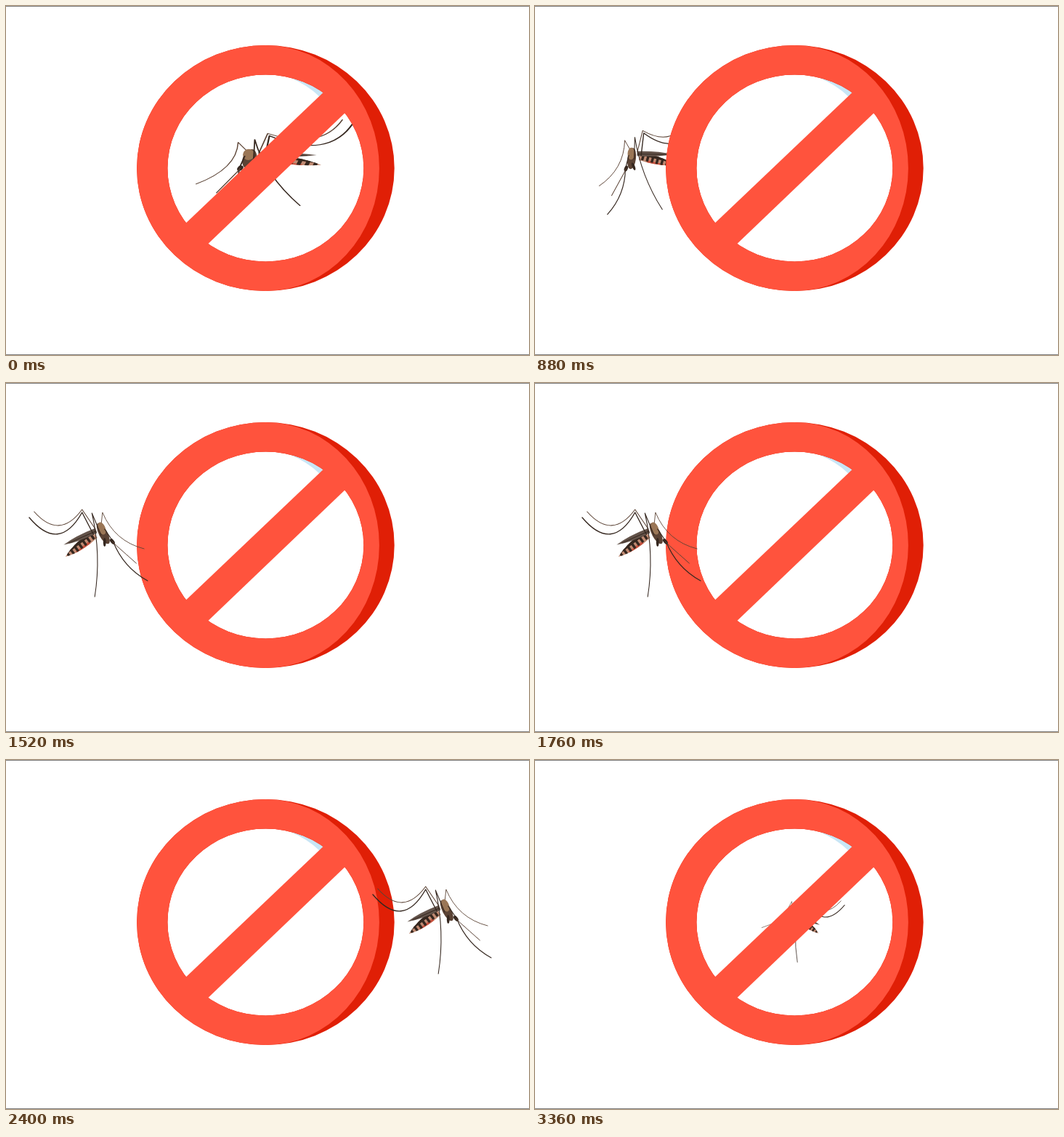
Write an HTML page with a canvas that moves like this. It is 720 px wide and 480 px high and loops after 3.44 s.

```html
<!DOCTYPE html>
<html lang="en">
<head>
<meta charset="utf-8">
<title>No mosquitoes</title>
<style>
html, body { margin: 0; width: 100%; height: 100%; overflow: hidden; background: #fff; }
canvas { display: block; }
</style>
</head>
<body>
<canvas id="stage" width="720" height="480"></canvas>
<script>
const ctx = document.getElementById('stage').getContext('2d');
const LOOP = 3440, STEP = 80, TAU = Math.PI * 2;
const DARK = '#35271f', BROWN = '#5b4335', TAN = '#9a7656';

const ramp = (t, from, to) => Math.min(1, Math.max(0, (t - from) / (to - from)));
const easeOut = u => 1 - (1 - u) ** 2;

// Out to the left behind the sign, across its front, back behind it
function poseAt(t) {
  const leave = easeOut(ramp(t, 0, 1263));
  const gather = ramp(t, 1280, 1760) ** 2;
  const cross = ramp(t, 1760, 2400);
  const back = ramp(t, 2400, 3360) ** 1.5;
  const turn = ramp(t, 1280, 1520);
  const turnBack = easeOut(ramp(t, 2400, 3040));
  const stretch = 1 - ramp(t, 0, 500);
  const grow = ramp(t, 500, 1280);
  const shrink = ramp(t, 2800, 3360);
  const size = 1 - .28 * shrink;
  return {
    x: 343 - 226 * leave + 44 * gather + 440 * cross - 244 * back,
    y: 207 - 2 * grow + 9 * shrink,
    sx: (2 * turn - 1 - 2 * turnBack) * (.97 + .63 * stretch) * size,
    sy: (.84 + .16 * grow) * size,
    tilt: .38 * (1 - turn),
    inFront: t > 1320 && t < 2760
  };
}

// Straight from hip to knee, then bowed down to the foot
function leg(color, width, hip, knee, foot, bow) {
  const [kx, ky] = knee, [fx, fy] = foot;
  ctx.strokeStyle = color;
  ctx.lineWidth = width;
  ctx.beginPath();
  ctx.moveTo(...hip);
  ctx.lineTo(kx, ky);
  ctx.quadraticCurveTo(
    (kx + fx) / 2 - bow * (fy - ky),
    (ky + fy) / 2 + bow * (fx - kx), fx, fy);
  ctx.stroke();
}

function blob(color, x, y, rx, ry, turn) {
  ctx.beginPath();
  ctx.ellipse(x, y, rx, ry, turn, 0, TAU);
  ctx.fillStyle = color;
  ctx.fill();
}

// Pointed shape along the x axis
function leaf(color, length, width) {
  ctx.beginPath();
  ctx.moveTo(0, -width);
  ctx.quadraticCurveTo(length * .6, -width * 1.4, length, 0);
  ctx.quadraticCurveTo(length * .6, width * 1.4, 0, width);
  ctx.fillStyle = color;
  ctx.fill();
}

function abdomen() {
  ctx.save();
  ctx.translate(-6, 3);
  ctx.rotate(2.5);
  leaf('#c08a72', 52, 6);
  ctx.clip();
  ctx.fillStyle = '#c8523f';
  ctx.fillRect(12, -8, 24, 5);
  ctx.fillStyle = DARK;
  ctx.fillRect(0, 2, 52, 6);
  for (let x = 3; x < 50; x += 7) ctx.fillRect(x, -5, 3.5, 12);
  ctx.restore();
}

function wing() {
  ctx.save();
  ctx.translate(-4, -2);
  ctx.rotate(2.74);
  leaf('#63534a', 50, 3.5);
  ctx.fillStyle = DARK;
  ctx.fillRect(0, -1, 42, 1);
  ctx.restore();
}

// Faces right, with the thorax at the zero point
function mosquito({ x, y, sx, sy, tilt }) {
  ctx.save();
  ctx.translate(x, y);
  ctx.scale(sx, sy);
  ctx.rotate(tilt);
  ctx.lineCap = ctx.lineJoin = 'round';

  leg(BROWN, .9, [2, 0], [5, -27], [64, 23], .25);
  leg(BROWN, 1.1, [-5, -4], [-24, -31], [-92, -28], -.6);
  abdomen();
  wing();

  blob(BROWN, 6, 2, 6, 16, -.5);
  blob(TAN, 4, -5, 5, 9, -.4);
  blob(DARK, 8, 14, 2, 6, 0);
  blob(DARK, 19, 13, 2.5, 4.5, -.7);

  leg(DARK, 1.4, [-8, 3], [-24, -27], [-99, -20], -.7);
  leg(DARK, 1.1, [3, 4], [-10, -26], [-6, 89], -.1);
  leg(DARK, 1.2, [8, -4], [20, 13], [69, 67], .18);
  leg(BROWN, 1, [19, 13], [24, 18], [53, 43], 0);
  ctx.restore();
}

function glint() {
  ctx.beginPath();
  ctx.moveTo(388, 92);
  ctx.lineTo(440, 116);
  ctx.lineTo(432, 125);
  ctx.quadraticCurveTo(416, 109, 390, 98);
  ctx.fillStyle = '#c8e6f6';
  ctx.fill();
}

function sign() {
  const cx = 357.4, cy = 223, rx = 177.3, ry = 169, up = -Math.PI / 2;

  // A ring whose right half may be narrower than its left
  const ring = (color, right) => {
    ctx.beginPath();
    ctx.ellipse(cx, cy, rx, ry, 0, -up, -3 * up);
    ctx.ellipse(cx, cy, right, ry, 0, up, -up);
    ctx.moveTo(cx + 135, cy);
    ctx.ellipse(cx, cy, 135, 128.5, 0, 0, TAU);
    ctx.fillStyle = color;
    ctx.fill('evenodd');
  };
  ring('#e01f06', rx);
  ring('#ff533d', 156.5);

  ctx.beginPath();
  ctx.moveTo(443, 113);
  ctx.lineTo(473, 141);
  ctx.lineTo(272, 333);
  ctx.lineTo(242, 304);
  ctx.fill();
}

function draw(t) {
  ctx.fillStyle = '#fff';
  ctx.fillRect(0, 0, 720, 480);
  const pose = poseAt(t);
  glint();
  if (!pose.inFront) mosquito(pose);
  sign();
  if (pose.inFront) mosquito(pose);
  ctx.fillStyle = '#808080';
  ctx.fillRect(0, 0, 720, 1);
  ctx.fillRect(0, 479, 720, 1);
}

const start = performance.now();
function tick() {
  const t = (performance.now() - start) % LOOP;
  draw(Math.floor(t / STEP) * STEP);
  requestAnimationFrame(tick);
}
tick();
</script>
</body>
</html>
```
